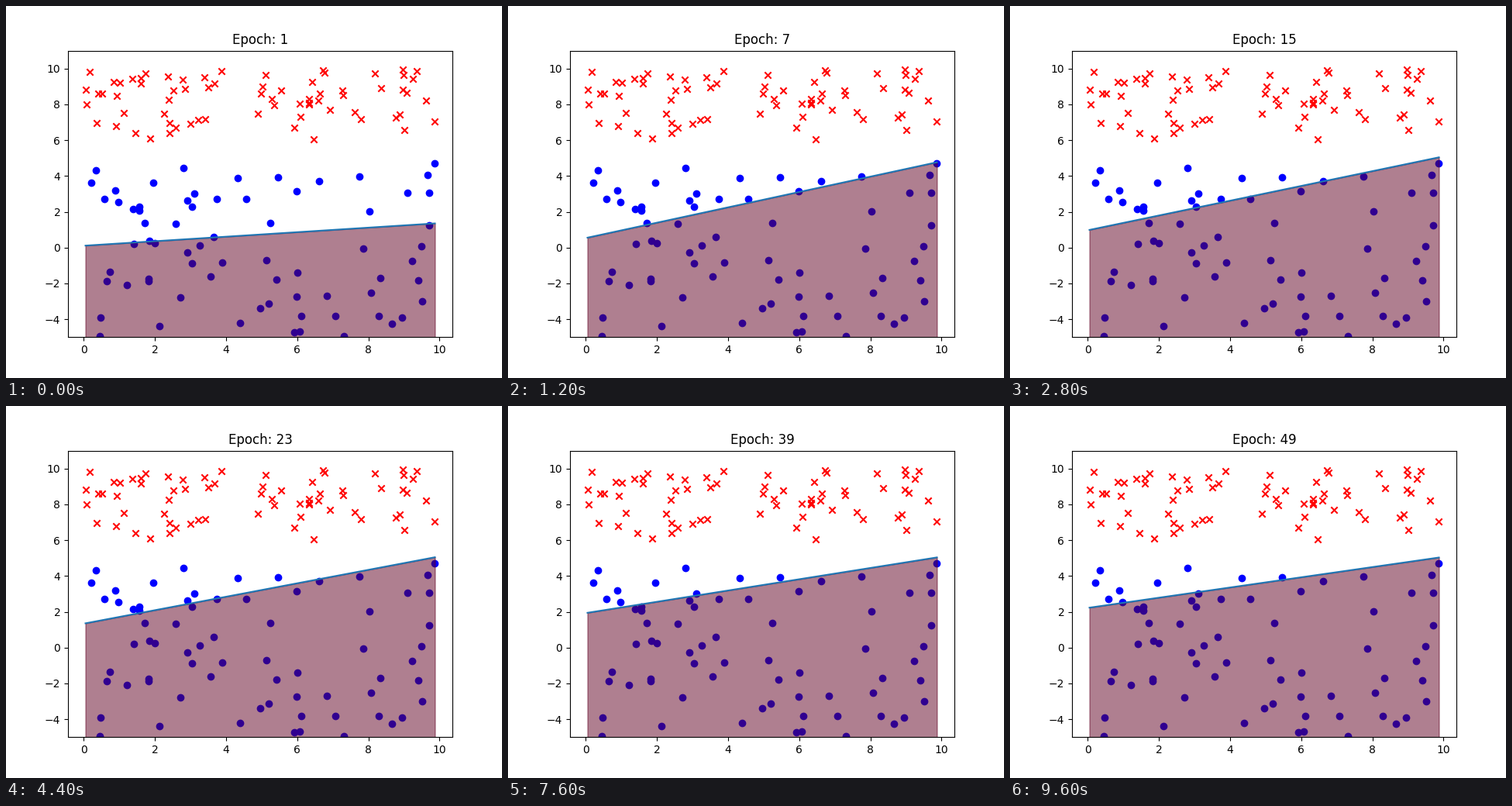
These frames come from a looping animation (640 by 480 pixels, 9.8 s). A matplotlib script:

```python
import numpy as np
import matplotlib.pyplot as plt
from matplotlib.animation import FuncAnimation

EPOCHS = 49
STEP_MS = 200
PER_CLASS = 70
Y_MIN, Y_MAX = -5, 11

rng = np.random.RandomState(42)


def sample(low, high):
    """One class of points, spread evenly between two heights."""
    x = rng.uniform(0, 10, PER_CLASS)
    y = rng.uniform(low, high, PER_CLASS)
    return x, y


def boundary(epoch):
    """Heights of the separating line at its left and right end."""
    fast = 0.654 ** (epoch - 1)
    slow = 0.9813 ** (epoch - 7)
    left = 3.61 - 3.05 * slow - 0.085 * fast
    right = 5.06 - 0.0006 * epoch - 3.71 * fast
    return left, right


lower = sample(-5, 5)
upper = sample(6, 10)
all_x = np.concatenate([lower[0], upper[0]])
x_min, x_max = all_x.min(), all_x.max()
ends = [x_min, x_max]

fig, ax = plt.subplots(figsize=(6.4, 4.8), dpi=100)
ax.scatter(*lower, color="blue", marker="o")
ax.scatter(*upper, color="red", marker="x")
region = ax.fill_between(ends, boundary(1), Y_MIN,
                         color="xkcd:burgundy", alpha=0.5)
line, = ax.plot(ends, boundary(1), color="tab:blue")
title = ax.set_title("Epoch: 1")

pad = 0.05 * (x_max - x_min)
ax.set_xlim(x_min - pad, x_max + pad)
ax.set_ylim(Y_MIN, Y_MAX)


def update(frame):
    epoch = frame + 1
    left, right = boundary(epoch)
    line.set_ydata([left, right])
    region.set_verts([[(x_min, Y_MIN), (x_min, left),
                       (x_max, right), (x_max, Y_MIN)]])
    title.set_text(f"Epoch: {epoch}")
    return line, region, title


anim = FuncAnimation(fig, update, frames=EPOCHS, interval=STEP_MS,
                     repeat=True, repeat_delay=0, blit=False)
plt.show()
```
